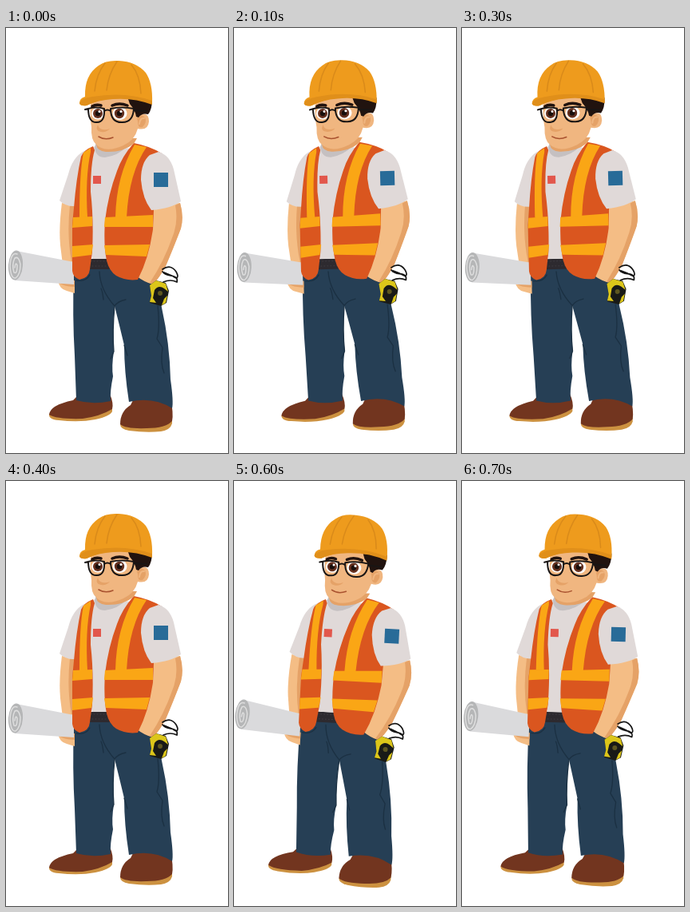
An HTML page that plays this animation: 278 by 532 pixels, repeating every 800 ms.

```html
<!DOCTYPE html>
<html lang="en">
<head>
<meta charset="utf-8">
<title>Swaying builder</title>
<style>
  html, body { margin: 0; width: 100%; height: 100%; overflow: hidden; background: #fff; }
  svg { display: block; width: 100%; height: 100%; }
  .skin { fill: #f4bd85; }
  .face { fill: #f0b680; }
  .shade { fill: #e5a267; }
  .shirt { fill: #e0d9d8; }
  .vest { fill: #da561f; }
  .tape { fill: #faa615; }
  .jeans { fill: #263f55; }
  .sole { fill: #cc9140; }
  .shoe { fill: #72351f; }
  .line { fill: none; stroke-linecap: round; stroke-linejoin: round; }
</style>
</head>
<body>
<svg viewBox="0 0 278 532">
  <g id="man">
    <!-- shoes -->
    <path class="sole" d="M54 483Q53 490 66 491Q92 494 112 490Q130 486 133 480V474L60 480Z"/>
    <path class="shoe" d="M54 484Q55 472 84 466L92 458H130Q135 470 133 477Q118 486 96 489Q64 490 54 484Z"/>
    <path class="sole" d="M143 496Q143 502 154 504Q176 507 194 505Q206 503 208 495V488L150 492Z"/>
    <path class="shoe" d="M143 496Q143 480 156 472L160 464H206Q210 482 208 492Q200 501 176 501Q150 502 143 496Z"/>

    <!-- trousers -->
    <path class="jeans" d="M85 304Q83 360 86 410L88 466Q108 472 131 467Q130 455 134 436Q132 424 135 405Q133 375 136 348Q142 372 148 397Q148 430 154 468Q184 461 208 476Q210 468 206 440Q205 395 195 350L188 312L165 295H105Z"/>
    <path class="line" stroke="#1b3042" stroke-width="1.3" d="M117 305Q118 328 136 348M136 348Q133 380 135 405L131 414M136 348Q140 342 150 340M165 311Q175 319 186 321M190 348Q193 376 189 389L196 400Q193 420 198 432M148 397L152 410M122 340Q121 330 119 326M88 316Q100 318 105 309"/>
    <path fill="#2d2a2f" d="M104 289H132V302H104Z"/>
    <path class="line" stroke="#4a464c" stroke-width=".6" stroke-dasharray="1 3" d="M106 292H130M108 298H130"/>

    <!-- far arm and paper roll -->
    <path class="skin" d="M70 219Q66 250 68 272L71 296H86V222Z"/>
    <path class="shade" d="M80 222Q76 260 82 292H86V222Z"/>
    <path class="skin" d="M65 316Q67 327 76 329L86 332V316Z"/>
    <path class="shade" d="M65 316Q67 323 86 324V316Z"/>
    <path fill="#dadadc" d="M13 279L85 293V321L11 316Z"/>
    <ellipse cx="12" cy="297" rx="9" ry="18.5" fill="#b5b6b7" transform="rotate(4 12 297)"/>
    <path class="line" stroke="#dedede" stroke-width="1.5" d="M14 283Q6 280 5 298Q6 314 12 313Q18 309 18 296Q16 285 11 288Q7 296 10 306Q14 309 14 297Q12 292 11 300"/>

    <!-- shirt -->
    <path class="shirt" d="M96 155Q83 163 78 183L67 216Q75 224 87 223L108 289H128L160 230V152L140 148H112Z"/>
    <path fill="#c5c0c1" d="M111 149Q112 162 124 162Q140 160 152 148L145 143H113Z"/>

    <!-- near arm -->
    <path class="skin" d="M178 224L218 219Q223 236 219 251Q209 277 200 298Q192 313 184 321Q173 318 164 311L172 270Z"/>
    <path class="shade" d="M212 222L218 219Q223 236 219 251Q209 277 200 298Q192 313 184 321L180 319Q198 292 209 260Q216 242 212 222Z"/>

    <!-- vest -->
    <path class="vest" d="M109 148Q97 153 94 161Q88 188 85 225L83 246V304Q84 312 92 315Q104 313 105 302L108 280Q110 240 106 205Q106 170 111 153Z"/>
    <path class="vest" d="M160 144Q181 148 195 157L185 228L184 252Q179 288 165 315Q150 317 138 310Q129 304 126 291Q122 272 124 241Q128 208 139 179Q145 161 160 144Z"/>
    <path class="tape" d="M106 150L97 156Q92 180 92 237H102Q99 187 106 155Z"/>
    <path class="tape" d="M161 146L176 149Q154 181 151 237H137Q138 185 161 146Z"/>
    <path class="tape" d="M84 237L108 236V248L83 250ZM83 273L109 271L107 284L83 287Z"/>
    <path class="tape" d="M124 237L184 234V249L123 249ZM123 272L180 271L176 286L125 284Z"/>
    <rect x="109" y="185" width="10" height="10" fill="#e2574c"/>

    <!-- near sleeve -->
    <path class="shirt" d="M191 155Q205 159 210 177L219 217Q207 226 182 228Q171 214 169 190Q169 168 180 159Z"/>
    <rect x="185" y="181" width="18" height="18" fill="#286b98"/>

    <!-- tape measure -->
    <path class="line" stroke="#151515" stroke-width="1.7" d="M196 302Q206 295 213 305Q217 312 213 313Q206 309 198 306M197 318Q206 314 214 318Q216 311 206 310Q199 309 196 305"/>
    <path fill="#191a17" d="M180 322L188 316L200 319L204 329L201 344L194 348L180 344L182 335Z"/>
    <path fill="#dcc61a" d="M180 322L188 316L200 320L203 330L198 326Q191 321 186 328L184 338L188 344L180 343L182 335ZM198 339L202 335L200 344L195 347Z"/>
    <circle cx="193" cy="332" r="6.5" fill="#191a17"/>
    <circle cx="193" cy="332" r="3" fill="#5d5620"/>

    <!-- head -->
    <path class="shade" d="M113 138H164L160 145Q146 156 125 155Q114 154 113 146Z"/>
    <path class="face" d="M106 94Q105 112 107 124Q106 140 113 146Q125 157 147 147Q161 141 165 126Q178 129 179 117Q179 106 170 108L172 88H106Z"/>
    <path class="shade" d="M164 113Q169 107 174 112Q177 118 171 124Q165 126 165 117Z"/>
    <path class="line" stroke="#f0b680" stroke-width="2" d="M167 120Q168 112 173 113"/>
    <path fill="#21130f" d="M153 89H183Q183 102 178 108Q170 106 166 112L163 111Q162 103 155 95Z"/>
    <path class="line" stroke="#21130f" stroke-width="3.5" d="M108 98Q113 95 119 97M133 97Q142 93 152 97"/>
    <ellipse cx="115" cy="107" rx="8" ry="7.5" fill="#fff"/>
    <ellipse cx="142.5" cy="107" rx="9" ry="8" fill="#fff"/>
    <g fill="#65301f">
      <circle cx="115" cy="107" r="6"/>
      <circle cx="142" cy="107" r="6.2"/>
    </g>
    <g fill="#190f0c">
      <circle cx="115" cy="107" r="3.2"/>
      <circle cx="142" cy="107" r="3.3"/>
    </g>
    <g fill="#fff">
      <circle cx="117" cy="104.5" r="1.5"/>
      <circle cx="144" cy="104.5" r="1.6"/>
    </g>
    <path class="line" stroke="#191514" stroke-width="2" d="M103 101Q112 98 123 101Q124 118 114 118Q103 119 103 101ZM131 101Q145 98 160 101Q159 118 146 118Q131 119 131 101ZM123 104Q127 101 131 104M160 103L176 104M103 101L99 102"/>
    <path class="shade" d="M115 121Q111 129 119 130Q126 131 130 126Q126 128 121 127Q116 126 115 121Z"/>
    <path class="line" stroke="#a9522f" stroke-width="1.5" d="M116 136Q124 141 134 137"/>

    <!-- helmet -->
    <path fill="#ee9b1d" d="M99 86Q98 59 116 47Q125 40 141 41Q163 42 175 56Q184 69 183 94Q161 86 134 88Q115 90 101 97Q93 98 92 94Q92 88 99 86Z"/>
    <path fill="#e08f1a" d="M92 94Q94 88 108 86Q149 79 183 91V96Q160 87 134 89Q115 90 101 97Q93 98 92 94Z"/>
    <path class="line" stroke="#d98a1a" stroke-width="1.5" d="M124 44Q113 58 111 79M139 42Q128 58 126 78M157 46Q168 59 169 82"/>
  </g>
</svg>
<script>
  const man = document.getElementById('man');
  const STEP = 100, STEPS = 8, TILT = 1.44;

  function draw(now) {
    const k = Math.floor(now / STEP) % STEPS;
    // triangle wave: 0 -1 -2 -1 0 1 2 1
    const sway = 2 - Math.abs((k + 6) % STEPS - 4);
    man.setAttribute('transform', `rotate(${sway * TILT} 112 265)`);
  }

  const start = performance.now();
  function loop() {
    draw(performance.now() - start);
    requestAnimationFrame(loop);
  }
  loop();
</script>
</body>
</html>
```
